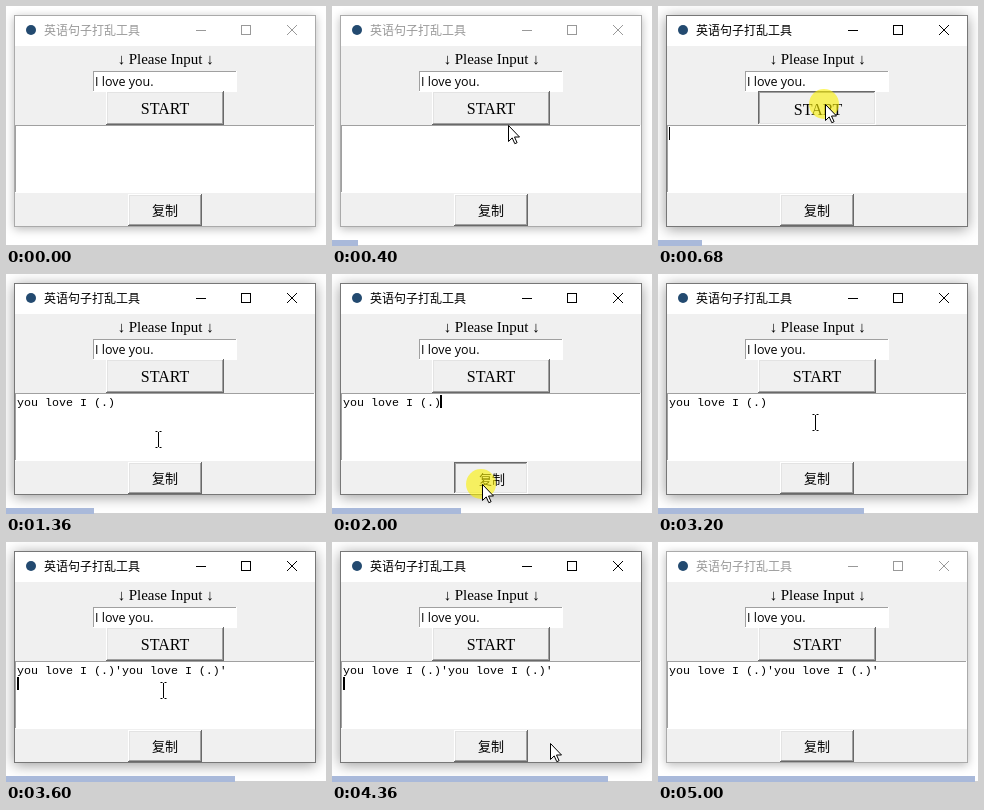
An HTML page with a canvas that plays this animation: 320x240 px, repeating every 5.08 s.

```html
<!DOCTYPE html>
<html lang="zh-CN">
<head>
<meta charset="utf-8">
<style>
html, body { margin: 0; width: 100%; height: 100%; overflow: hidden; background: #fff; }
canvas { display: block; }
</style>
</head>
<body>
<canvas id="stage" width="320" height="240"></canvas>
<script>
const ctx = document.getElementById('stage').getContext('2d');
const LOOP = 5080, TICK = 40, LAST_TICK = 125, STEPS = 109;
const SERIF = '"Liberation Serif", serif';
const CJK = '"Noto Sans CJK SC", "Noto Sans CJK", sans-serif';

// Pointer stops: time, x, y
const path = [
  [0, 236, 250], [520, 167, 98], [880, 167, 98], [1120, 153, 120],
  [1600, 150, 210], [2320, 150, 210], [2600, 157, 148], [3960, 157, 148],
  [4320, 218, 201], [4560, 218, 201], [4840, 236, 250]
];

const within = (t, from, to) => t >= from && t < to;

function rect(x, y, w, h, color) {
  ctx.fillStyle = color;
  ctx.fillRect(x, y, w, h);
}

function text(str, x, y, font, color = '#000', align = 'left') {
  ctx.font = font;
  ctx.fillStyle = color;
  ctx.textAlign = align;
  ctx.fillText(str, x, y);
}

function stroke(color, ...lines) {
  ctx.strokeStyle = color;
  ctx.lineWidth = 1;
  ctx.beginPath();
  for (const [x1, y1, x2, y2] of lines) {
    ctx.moveTo(x1, y1);
    ctx.lineTo(x2, y2);
  }
  ctx.stroke();
}

function disc(x, y, r, color) {
  ctx.fillStyle = color;
  ctx.beginPath();
  ctx.arc(x, y, r, 0, 7);
  ctx.fill();
}

// Two-pixel bevel, outer ring first
function bevel(x, y, w, h, fill, topLeft, bottomRight) {
  for (let i = 0; i < 2; i++) {
    rect(x + i, y + i, w - 2 * i, h - 2 * i, bottomRight[i]);
    rect(x + i, y + i, w - 2 * i - 1, h - 2 * i - 1, topLeft[i]);
  }
  rect(x + 2, y + 2, w - 4, h - 4, fill);
}

function field(x, y, w, h) {
  bevel(x, y, w, h, '#fff', ['#a0a0a0', '#fff'], ['#fff', '#fff']);
}

function button(x, y, w, h, label, baseline, font, pressed) {
  const light = ['#fff', '#e3e3e3'], dark = ['#696969', '#a0a0a0'];
  bevel(x, y, w, h, '#f0f0f0', pressed ? dark : light, pressed ? light : dark);
  const shift = pressed ? 1 : 0;
  text(label, x + w / 2 + shift, baseline + shift, font, '#000', 'center');
}

function drawWindow(active) {
  const ink = active ? '#000' : '#999';
  ctx.save();
  ctx.shadowColor = active ? 'rgba(0,0,0,.4)' : 'rgba(0,0,0,.28)';
  ctx.shadowBlur = active ? 13 : 9;
  ctx.shadowOffsetY = 2;
  rect(8, 9, 302, 212, active ? '#777' : '#aaa');
  ctx.restore();
  rect(9, 10, 300, 30, '#fff');
  rect(9, 40, 300, 180, '#f0f0f0');
  disc(25, 24, 5, '#234a70');
  text('英语句子打乱工具', 38, 29, '12px ' + CJK, ink);
  stroke(ink, [190, 24.5, 200, 24.5], [281, 19, 291, 29], [291, 19, 281, 29]);
  ctx.strokeRect(235.5, 19.5, 9, 9);
}

function drawForm(t) {
  text('↓', 115.5, 58, '15px ' + SERIF, '#000', 'center');
  text('Please Input', 159.5, 58, '15px ' + SERIF, '#000', 'center');
  text('↓', 204, 58, '15px ' + SERIF, '#000', 'center');
  field(87, 65, 144, 21);
  text('I love you.', 89, 80, '12.5px "Open Sans", "Noto Sans", sans-serif');
  button(100, 85, 118, 34, 'START', 108, '16px ' + SERIF, within(t, 600, 840));
  field(9, 119, 300, 68);
  button(122, 188, 74, 32, '复制', 209, '500 13px ' + CJK, within(t, 1800, 2320));
}

function drawOutput(t) {
  const words = 'you love I (.)', pasted = t >= 3520;
  const shown = t < 840 ? '' : pasted ? `${words}'${words}'` : words;
  text(shown, 11, 132, '11.67px "Liberation Mono", monospace');
  const blinkOn = (t - 540 + 900) % 900 < 600 || within(t, 1800, 2340);
  if (within(t, 600, 4800) && blinkOn) {
    rect(shown && !pasted ? 108 : 11, pasted ? 135 : 121, shown ? 2 : 1, 13, '#000');
  }
}

function pointerAt(t) {
  const i = path.findIndex(stop => stop[0] > t);
  if (i < 1) return null;
  const [t0, x0, y0] = path[i - 1], [t1, x1, y1] = path[i];
  const u = (t - t0) / (t1 - t0), e = u * u * (3 - 2 * u);
  return [Math.round(x0 + (x1 - x0) * e), Math.round(y0 + (y1 - y0) * e)];
}

function drawPointer(t) {
  const at = t > 0 && pointerAt(t);
  if (!at) return;
  const [x, y] = at;
  if (within(t, 600, 840) || within(t, 1800, 2240)) disc(x - 1, y, 15, 'rgba(250,240,0,.6)');
  if (within(y, 121, 186)) {
    const cx = x + .5;
    stroke('#000', [cx, y - 7, cx, y + 8], [cx - 3, y - 7.5, cx - 1, y - 7.5], [cx + 1, y - 7.5, cx + 3, y - 7.5],
      [cx - 3, y + 8.5, cx - 1, y + 8.5], [cx + 1, y + 8.5, cx + 3, y + 8.5]);
    return;
  }
  ctx.save();
  ctx.translate(x + .5, y + .5);
  const arrow = new Path2D('M0 0V16L3.7 12.4L6.3 18.2L8.6 17.2L6 11.5H11Z');
  ctx.fillStyle = '#fff';
  ctx.fill(arrow);
  ctx.strokeStyle = '#000';
  ctx.lineWidth = 1;
  ctx.stroke(arrow);
  ctx.restore();
}

const skips = tick => Math.max(0, Math.floor((tick - 1.66) / 7.15));

function draw(now) {
  let tick = Math.min(LAST_TICK, Math.floor(now % LOOP / TICK));
  if (skips(tick) > skips(tick - 1)) tick--;
  const t = tick * TICK;
  rect(0, 0, 320, 240, '#fff');
  drawWindow(within(t, 600, 4800));
  drawForm(t);
  drawOutput(t);
  drawPointer(t);
  rect(0, 239, 320, 1, '#d0d0d0');
  rect(0, 234, Math.round(320 * (tick - skips(tick)) / STEPS), 6, '#a9b9da');
}

const start = performance.now();
function loop() {
  draw(performance.now() - start);
  requestAnimationFrame(loop);
}
loop();
</script>
</body>
</html>
```
